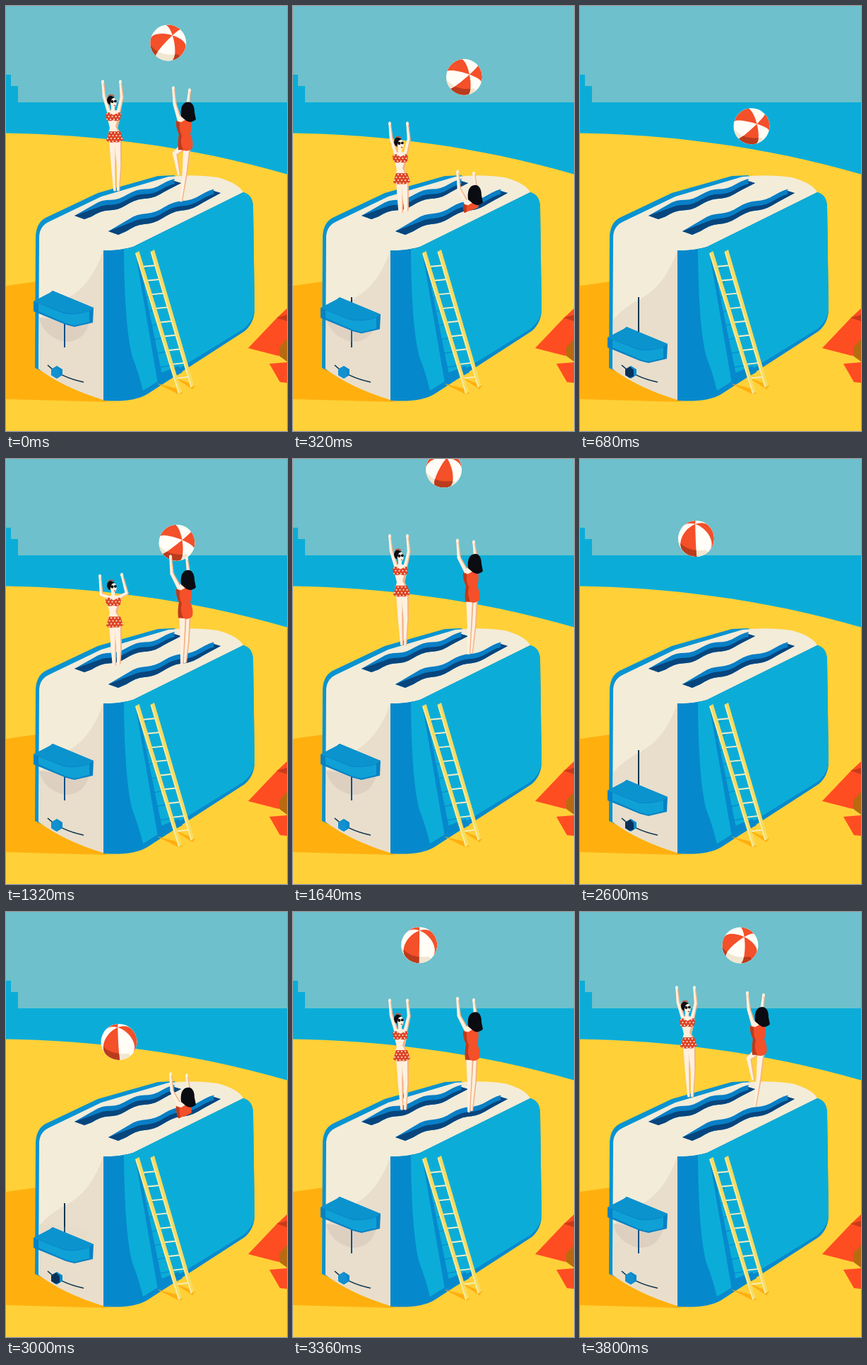
An HTML page with a canvas that plays this animation: 398x600 px, repeating every 3.84 s.

```html
<!DOCTYPE html>
<html lang="en">
<head>
<meta charset="utf-8">
<title>Toaster beach</title>
<style>
html, body { margin: 0; width: 398px; height: 600px; overflow: hidden; background: #ffd038; }
canvas { display: block; width: 398px; height: 600px; }
</style>
</head>
<body>
<canvas id="stage"></canvas>
<script>
const W = 398, H = 600, LOOP = 3840, HALF = LOOP / 2, STEP = 40;
const cv = document.getElementById('stage');
const g = cv.getContext('2d');
const dpr = window.devicePixelRatio || 1;
cv.width = W * dpr;
cv.height = H * dpr;

const SKIN = '#fff0df', SHADE = '#f3b286', RED = '#f4502a', DARK_RED = '#b93c1d';
const BLUE = '#0badd8', MID = '#0689cc', NAVY = '#07457d', CREAM = '#f3ecd9', INK = '#0b0b12';

// Motion rules
const clamp = v => Math.min(1, Math.max(0, v));
const mix = (a, b, k) => a + (b - a) * k;
const ramp = (t, a, b) => { const s = clamp((t - a) / (b - a)); return s * s * (3 - 2 * s); };
const mod = (t, n) => ((t % n) + n) % n;

const SUNK = 200, POP = 1060, PEAK = 1900;
const RIGHT_LEAD = 90;

// How far a jumper is below the peak of the jump, once per half loop
function drop(t) {
  const h = mod(t, HALF);
  if (h >= POP && h < PEAK) return SUNK * (1 - (h - POP) / (PEAK - POP)) ** 4;
  return Math.min(SUNK, 1.5 * (mod(h - PEAK, HALF) / 100) ** 3);
}
const leftDrop = t => drop(t);
const rightDrop = t => drop(t + RIGHT_LEAD) - 1;

function leverDrop(t) {
  const h = mod(t, HALF);
  return 51 * (ramp(h, 260, 480) - ramp(h, POP, POP + 80));
}
const crouch = t => {
  const h = mod(t, HALF);
  return ramp(h, 600, 700) - ramp(h, 1320, 1440);
};
const kick = t => {
  const m = mod(t, LOOP);
  return ramp(m, 1640, 1840) - ramp(m, 2020, 2260);
};

// Each throw: release time, x range and glide time, rise time, top, pull
const throws = [
  { at: 1320, from: 242, to: 160, glide: 1670, rise: 400, top: 14, pull: 18.7, hands: t => 116 + rightDrop(t) },
  { at: 3240, from: 160, to: 243, glide: 1000, rise: 280, top: 24, pull: 23, hands: t => 120 + leftDrop(t) }
];
function ballSpot(t) {
  const i = t >= throws[0].at && t < throws[1].at ? 0 : 1;
  const th = throws[i], catcher = throws[1 - i];
  const age = mod(t - th.at, LOOP), fall = age - th.rise;
  const x = mix(th.from, th.to, 1 - (1 - clamp(age / th.glide)) ** 2);
  if (fall < 0) {
    const low = th.hands(th.at) - 20;
    return [x, mix(th.top, low, (-fall / th.rise) ** 3)];
  }
  const y = th.top + th.pull * (fall / 280) ** 1.45;
  return [x, Math.min(y, 230, catcher.hands(t) - 20)];
}

// Drawing helpers
const fill = (color, d) => { g.fillStyle = color; g.fill(new Path2D(d)); };
const line = (color, width, d) => {
  g.strokeStyle = color;
  g.lineWidth = width;
  g.stroke(new Path2D(d));
};
const oval = (color, x, y, rx, ry = rx, turn = 0) => {
  g.fillStyle = color;
  g.beginPath();
  g.ellipse(x, y, rx, ry, turn, 0, 7);
  g.fill();
};
function taper(color, [x1, y1], [x2, y2], a, b) {
  const len = Math.hypot(x2 - x1, y2 - y1) || 1;
  const nx = (y1 - y2) / len, ny = (x2 - x1) / len;
  g.fillStyle = color;
  g.beginPath();
  g.moveTo(x1 + nx * a, y1 + ny * a);
  g.lineTo(x2 + nx * b, y2 + ny * b);
  g.lineTo(x2 - nx * b, y2 - ny * b);
  g.lineTo(x1 - nx * a, y1 - ny * a);
  g.fill();
  oval(color, x2, y2, b);
}
function limb(root, mid, end, [a, b, c]) {
  for (const [tone, dx, k] of [[SHADE, .5, 1], [SKIN, -.5, .8]]) {
    const [p, q, r] = [root, mid, end].map(([x, y]) => [x + dx, y]);
    taper(tone, p, q, a * k, b * k);
    taper(tone, q, r, b * k, c * k);
  }
}
const ARM = [2.8, 2.2, 1.5], LEG = [5.4, 3.4, 1.7];
const blend = (a, b, k) => a.map((v, i) => mix(v, b[i], k));

function arm(shoulder, elbow, hand, widths = ARM) {
  limb(shoulder, elbow, hand, widths);
  oval(SKIN, hand[0], hand[1], 1.9, 2.8);
}

function dotted(d, x, y, w, h) {
  fill('#dd4526', d);
  g.save();
  g.clip(new Path2D(d));
  for (let r = 0; r * 4 < h; r++)
    for (let c = 0; c * 5 < w; c++) oval('#fff4e6', x + c * 5 + (r % 2) * 2.5, y + r * 4, 1);
  g.restore();
}

function leftWoman(t) {
  const bend = crouch(t), lift = kick(t);
  limb([151, 190], blend([152, 224], [159, 226], lift), blend([154, 260], [159, 260], lift), LEG);
  limb([158, 190], blend([160, 224], [168, 207], lift), blend([159, 260], [157, 226], lift), LEG);
  arm([146, 150], blend([139, 128], [135, 146], bend), blend([137, 107], [133, 120], bend));
  arm([159, 150], blend([164, 129], [171, 144], bend), blend([162, 107], [164, 118], bend));
  fill(SKIN, 'M144 149Q152 145 161 149L161 160 158 172 165 188H143L147 172 144 160Z');
  fill(SHADE, 'M161 150V160L158 172 163 181 159 178 155 170 158 160Z');
  fill(SKIN, 'M149 140H154V149H149Z');
  dotted('M141 152L146 150 152 154 160 150 163 152 162 160Q157 164 152 161 146 164 142 160Z', 143, 152, 22, 12);
  dotted('M146 177H162L166 189Q160 194 154 192 147 194 142 190Z', 144, 179, 24, 17);
  oval(INK, 148, 133, 5, 6.5);
  oval(SKIN, 152, 136, 4.6, 7, -.15);
  fill(INK, 'M144 132Q147 125 154 129L150 131 147 139Z');
  line('#dd4526', 1.6, 'M145 127Q149 124 153 127');
  oval(INK, 150.4, 135, 2.1);
  oval(INK, 154.8, 134.4, 1.9);
  oval('#d8321c', 154, 140.5, 1.3, .7);
}

function rightWoman(t) {
  const lift = kick(t + HALF);
  arm([257, 159], [258, 135], blend([256, 118], [260, 118], lift));
  limb([256, 197], blend([256, 233], [253, 236], lift), blend([253, 273], [248, 274], lift), LEG);
  limb([250, 198], blend([250, 233], [239, 207], lift), blend([249, 275], [245, 237], lift), LEG);
  arm([246, 161], blend([235, 140], [239, 138], lift), blend([233, 116], [237, 115], lift), [3.2, 2.4, 1.6]);
  fill(SKIN, 'M243 158L250 152 261 157 262 168H245Z');
  fill(RED, 'M241 161L248 163 255 159 262 160Q264 171 261 180 266 190 264 200 258 205 253 203L244 202Q243 190 245 180 240 169 241 161Z');
  fill(DARK_RED, 'M241 161L246 164Q245 174 249 182 246 192 251 202L244 202Q243 190 245 180 240 169 241 161Z');
  fill(INK, 'M249 141Q253 133 261 135 267 138 267 149L269 159Q261 166 254 160L248 155Q247 147 249 141Z');
}

function ball(t) {
  const R = 25.5, [x, y] = ballSpot(t);
  // The ball rolls as it travels sideways
  const roll = Math.max(0, (x - 188) / 56) ** 2;
  const px = (x - 175) / 230, py = -.8 + .7 * roll, spin = (120 - 140 * roll) * Math.PI / 180;
  const pz = Math.sqrt(1 - px * px - py * py), k = Math.hypot(py, pz);
  const u = [k, -px * py / k, -px * pz / k], v = [0, pz / k, -py / k];
  const rim = ph => Math.atan2(pz, -(u[2] * Math.cos(ph) + v[2] * Math.sin(ph)));
  const point = (th, ph) => [px, py].map((e, i) =>
    R * (e * Math.cos(th) + (u[i] * Math.cos(ph) + v[i] * Math.sin(ph)) * Math.sin(th)));
  const N = 16, red = new Path2D();
  for (let j = 0; j < 3; j++) {
    const a = spin + j * Math.PI * 2 / 3 - Math.PI / 6, b = a + Math.PI / 3;
    for (let i = 0; i <= N; i++) red.lineTo(...point(rim(a) * i / N, a));
    for (let i = 0; i <= N; i++) { const ph = mix(a, b, i / N); red.lineTo(...point(rim(ph), ph)); }
    for (let i = N; i >= 0; i--) red.lineTo(...point(rim(b) * i / N, b));
    red.closePath();
  }
  const shadow = new Path2D('M-26 2Q-14 20 14 16L20 26H-26Z');
  g.save();
  g.translate(x, y);
  oval('#fffdf6', 0, 0, R);
  g.clip();
  g.fillStyle = '#f1e6d0';
  g.fill(shadow);
  g.fillStyle = RED;
  g.fill(red);
  g.clip(red);
  g.fillStyle = DARK_RED;
  g.fill(shadow);
  g.restore();
}

function scenery() {
  fill('#6dc0cc', 'M0 0H398V137H0Z');
  fill(BLUE, 'M0 136H398V240H0ZM0 97H7V113H17V137H0Z');
  fill('#ffd038', 'M0 179.5C118 181 258 197 398 237.5V600H0Z');
  fill('#ffb00f', 'M0 395L43 389 60 520 145 559 0 555Z');
  fill('#ff4d22', 'M398 427L384 440 343 483 386 494 398 480ZM373 505L398 503V532L388 531Z');
  fill('#b96a10', 'M398 470L387 482 387 494 398 502Z');
  fill('#c93b18', 'M383 440L398 436V445Z');
}

function slot(dx, dy, run, rise) {
  // A wavy slot: blue back wall over a dark inside
  const at = (s, off) => [dx + run * s, dy - rise * s + off + 2 * Math.sin(s * 19)];
  const band = (color, top) => {
    g.fillStyle = color;
    g.beginPath();
    g.moveTo(dx, dy);
    for (let s = .22; s < .95; s += .04) g.lineTo(...at(s, top));
    g.lineTo(dx + run - 10, dy - rise - 3);
    g.lineTo(dx + run, dy - rise);
    for (let s = .88; s > .12; s -= .04) g.lineTo(...at(s, 9 - 4 * s));
    g.lineTo(dx + 14, dy + 5);
    g.fill();
  };
  band('#087fc6', -7);
  band(NAVY, 0);
}

function toaster() {
  fill('#0993d0', 'M41 511L42 325Q43 306 56 299L130 264 215 240 238 239 260 250 140 556Z');
  fill(CREAM, 'M46 512L47 325Q48 310 62 304L135 269 230 241Q268 237 300 242 329 250 336 263L180 340Q160 346 138 345V556Q80 538 46 512Z');
  fill('#e8decb', 'M138 345Q120 396 86 413 62 425 47 443L46 512Q80 538 138 556Z');
  fill(MID, 'M138 345Q160 346 180 340L336 263Q349 266 350 283L352 428Q352 447 338 459L200 548Q180 560 138 557Z');
  fill(BLUE, 'M167 343Q173 343 180 340L336 263Q350 267 350 284L352 428Q351 444 336 456L194 543Q189 521 179 495 168 455 167 343Z');
  slot(97, 296, 151, 46);
  slot(145, 318, 159, 54);
}

function ladder() {
  fill('#ffae10', 'M214 533L246 541 250 547 244 548ZM238 524L268 536 264 541Z');
  fill(MID, 'M184 352L188 358 223 530 215 533ZM217 519L244 508 250 517 221 533Z');
  for (let i = 1; i < 9; i++) {
    const y = 353 + i * 19.7;
    line(MID, 1.1, `M${186 + i * 3.7} ${y}L${196 + i * 4.5} ${y - 3}`);
  }
  for (let i = 0; i < 9; i++) {
    const y = 368 + i * 19.7, x = 193 + i * 6;
    line('#f6efc4', 1.9, `M${x} ${y}L${x + 21 - i * .5} ${y - 2}`);
  }
  for (const [x, y, run, fall] of [[183, 349, 61, 199], [204.5, 347, 57, 192]]) {
    fill('#f6dc62', `M${x} ${y}L${x + 5.5} ${y - 3} ${x + run + 5} ${y + fall - 3} ${x + run} ${y + fall}Z`);
    line('#fdeeb0', 1.4, `M${x + 1} ${y}L${x + run + 1} ${y + fall - 1}`);
  }
}

function controls(low) {
  const down = low / 51;
  line('#12364f', 2, 'M83 411V482');
  g.globalAlpha = 1 - down;
  fill('#ddd0c1', 'M47 440Q53 467 83 474 109 475 118 448Z');
  line('#0b4f86', 2, 'M83 445V482');
  g.globalAlpha = 1;
  line('#12364f', 1.7, 'M59 507Q77 524 110 531');
  fill(MID, 'M64 513L72 508 80 513V521L72 526 64 521Z');
  fill(down > .5 ? '#0a3159' : '#1390cf', 'M64 513L71 509 76 514 76 523 70 525 64 521Z');
  g.save();
  g.translate(0, low);
  fill('#0781c4', 'M39 417L62 405 66 402 124 426 123 447 97 453 85 450 39 431Z');
  fill('#0b93ce', 'M39 417L62 405 66 402 124 426 117 431Q96 436 82 433Z');
  fill('#0fa0d6', 'M46 420L82 434Q98 437 118 431V446L97 451 85 448 46 431Z');
  g.restore();
}

function inSlot(edge, low, draw, t) {
  g.save();
  g.clip(new Path2D(edge));
  g.translate(0, low);
  draw(t);
  g.restore();
}

function render(t) {
  g.setTransform(dpr, 0, 0, dpr, 0, 0);
  scenery();
  toaster();
  controls(leverDrop(t));
  ladder();
  ball(t);
  inSlot('M90 0H215V270L165 289 128 298 90 300Z', leftDrop(t), leftWoman, t);
  inSlot('M215 0H310V263L256 287 215 302Z', rightDrop(t), rightWoman, t);
}

const start = performance.now();
function tick() {
  const t = (performance.now() - start) % LOOP;
  render(Math.floor(t / STEP) * STEP);
  requestAnimationFrame(tick);
}
tick();
</script>
</body>
</html>
```
